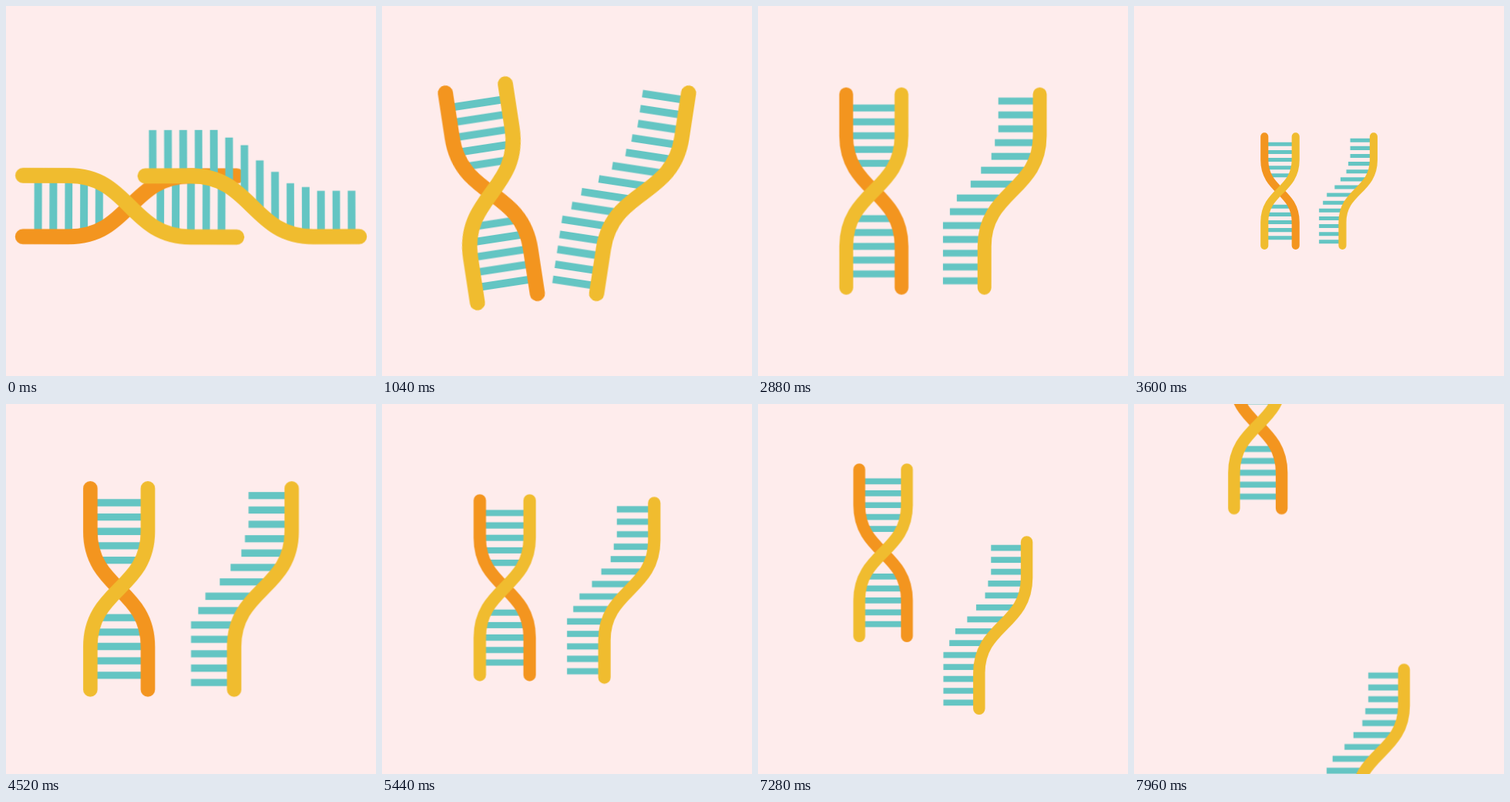
Write an HTML page that moves like this. It is 480 by 480 pixels and loops after 8000 ms.

```html
<!DOCTYPE html>
<html lang="en">
<head>
<meta charset="utf-8">
<title>DNA and RNA</title>
<style>
  html, body { margin: 0; width: 100%; height: 100%; overflow: hidden; background: #feecec; }
  svg { display: block; width: 100%; height: 100%; }
  path { fill: none; }

  .strand { stroke-width: 20; stroke-linecap: round; }
  .orange { stroke: #f3951f; }
  .yellow { stroke: #f0bc2f; }
  .rungs { stroke: #64c5c3; stroke-width: 10; }

  .dna { --dir: -1; }
  .rna { --dir: 1; }
  .leave, .zoom, .spin { animation: 8s infinite; }
  .leave { animation-name: leave; }
  .zoom { animation-name: zoom; }
  .spin { animation-name: spin; }

  @keyframes spin {
    0% { transform: rotate(calc(var(--dir) * 90deg)); animation-timing-function: cubic-bezier(.19, 1, .22, 1); }
    41.67%, 100% { transform: rotate(0deg); }
  }
  /* shrink to nothing, then cut to a close view that settles */
  @keyframes zoom {
    0% { transform: scale(.9915); animation-timing-function: cubic-bezier(.95, .025, .793, .035); }
    49.999% { transform: scale(0); animation-timing-function: step-end; }
    50% { transform: scale(1.487); animation-timing-function: cubic-bezier(0, 1, .25, 1); }
    100% { transform: scale(.772); }
  }
  @keyframes leave {
    0%, 50% { transform: translate(0px, 0px); animation-timing-function: cubic-bezier(.75, 0, .98, 0); }
    100% { transform: translate(calc(var(--dir) * 2.8px), calc(var(--dir) * 277px)); }
  }
</style>
</head>
<body>
<svg viewBox="0 0 480 480">
  <defs>
    <path id="curve" d="M40-140V-80C40 0-40 0-40 80V140"/>
  </defs>
  <g transform="translate(240 240)">
    <g class="dna leave"><g class="zoom"><g transform="translate(-80 0)"><g class="spin"><g transform="translate(-20 0)">
      <path class="rungs" d="M-40-120H40M-40-100H40M-40-80H40M-38-60H38M-31-40H31
        M-31 40H31M-38 60H38M-40 80H40M-40 100H40M-40 120H40"/>
      <use href="#curve" class="strand orange" transform="scale(-1 1)"/>
      <use href="#curve" class="strand yellow"/>
    </g></g></g></g></g>
    <g class="rna leave"><g class="zoom"><g transform="translate(80 0)"><g class="spin"><g transform="translate(20 0)">
      <path class="rungs" d="M-20-130H40M-20-110H40M-20-90H40M-25-70H39M-30-50H35M-45-30H25M-60-10H10
        M-80 10H-10M-90 30H-25M-100 50H-35M-100 70H-39M-100 90H-40M-100 110H-40M-100 130H-40"/>
      <use href="#curve" class="strand yellow"/>
    </g></g></g></g></g>
  </g>
</svg>
</body>
</html>
```
